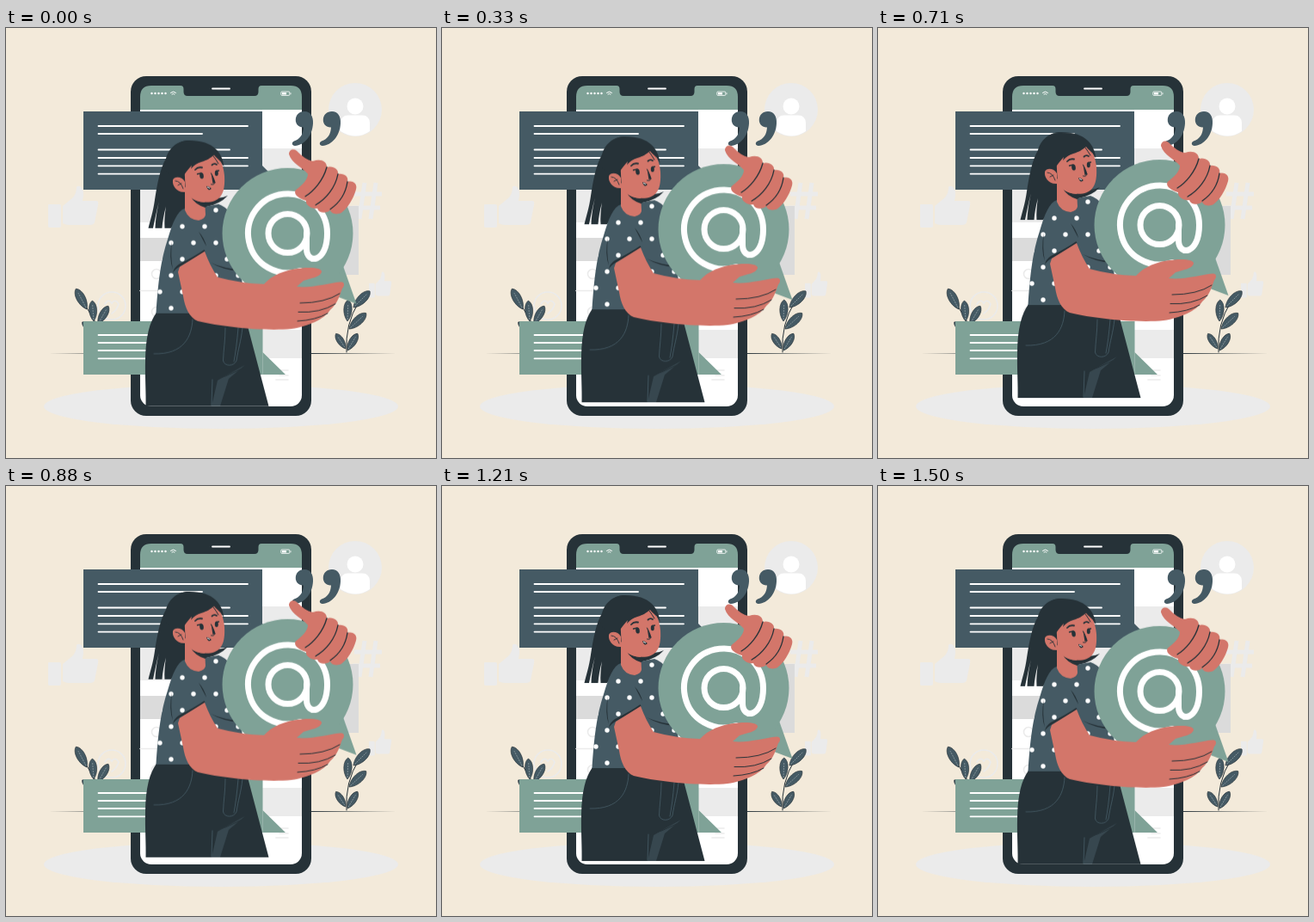
Recreate the animation shown at these times as an HTML page. Size 500 px wide and 500 px high, loop 1.54 s.

```html
<!DOCTYPE html>
<html lang="en">
<head>
<meta charset="utf-8">
<title>Hugging a chat bubble</title>
<style>
  html, body { margin: 0; width: 100%; height: 100%; overflow: hidden; background: #f3eada; }
  svg { display: block; width: 100vw; height: 100vh; }
  .ink { fill: #263238; }
  .slate { fill: #455a64; }
  .sage { fill: #7fa297; }
  .skin { fill: #d3766a; }
  .mist { fill: #ebebeb; }
  .white { fill: #fff; }
  .line { fill: none; stroke: #263238; stroke-linecap: round; stroke-linejoin: round; }
  .seam { fill: none; stroke: #455a64; stroke-width: .9; stroke-linecap: round; }
  .text { fill: none; stroke: #fff; stroke-width: 1.8; stroke-linecap: round; }
  .faint { fill: none; stroke: #ebebeb; stroke-width: 1.6; stroke-linecap: round; }
</style>
</head>
<body>
<svg viewBox="0 0 500 500">
  <defs>
    <pattern id="dots" x="192" y="230" width="26" height="38" patternUnits="userSpaceOnUse">
      <rect width="26" height="38" fill="#455a64"/>
      <g fill="#fff">
        <circle cx="13" cy="0" r="2.7"/><circle cx="13" cy="38" r="2.7"/>
        <circle cx="0" cy="19" r="2.7"/><circle cx="26" cy="19" r="2.7"/>
      </g>
    </pattern>
    <path id="thumb" d="M0 23Q0 22 1 22H13Q15 22 15 24V47Q15 49 13 49H1Q0 49 0 47ZM17 24L29 14Q33 9 33 2Q34 0 37 1Q43 4 40 18H56Q59 18 58 23L54 43Q53 46 49 46H24Q20 46 17 44Z"/>
    <path id="quote" d="M347 97C354 97 357.500 103 357 111C356 126 347 136 336 137C332.500 137 331.500 133 335 131.500C342 129 345.500 124 346 115.500C341 116 336.500 112 336.800 106.500C337 101 341 97 347 97Z"/>
  </defs>

  <!-- backdrop -->
  <ellipse class="mist" cx="250" cy="440" rx="206" ry="26"/>
  <path class="ink" d="M50 378.500L150 378H350L454 378.500L350 379H150Z"/>
  <use href="#thumb" class="mist" x="49" y="183"/>
  <use href="#thumb" class="mist" transform="translate(422 283) scale(.45 .62)"/>
  <path d="M417 180L411 222M430 180L424 222M405 193H437M403 209H435" fill="none" stroke="#ebebeb" stroke-width="5"/>
  <circle class="faint" cx="123" cy="323" r="16"/>
  <path class="faint" d="M115 321Q119 314 123 320Q127 314 131 321Q129 328 123 332"/>
  <circle class="mist" cx="406" cy="95" r="31"/>
  <circle class="white" cx="406" cy="91" r="9.500"/>
  <path class="white" d="M389 120V111Q389 101.500 398 101.500H414Q423 101.500 423 111V120Q407 131 389 120Z"/>
  <g id="plants"></g>

  <!-- phone -->
  <rect class="ink" x="145" y="56" width="210" height="395" rx="18"/>
  <rect class="white" x="156" y="80" width="188" height="360" rx="13"/>
  <path class="white" d="M156 90H344V100H156Z"/>
  <path class="sage" d="M156 95V80Q156 67 169 67H203Q206.500 67 206.500 71V74Q206.500 79 211 79H289Q293.500 79 293.500 74V71Q293.500 67 297 67H331Q344 67 344 80V95Z"/>
  <path class="text" d="M240 70.500H260"/>
  <path class="text" d="M169.500 76H186" stroke-dasharray="0 4" style="stroke-width:2.4"/>
  <path class="text" d="M191.500 75.300Q194.500 72.600 197.500 75.300M193 77Q194.500 75.600 196 77" style="stroke-width:1"/>
  <rect x="319.800" y="74" width="10" height="4.400" rx="1" fill="none" stroke="#fff" stroke-width=".8"/>
  <path class="white" d="M321 75H326V77.500H321ZM330.600 75.200H331.400V77.200H330.600Z"/>
  <path class="mist" d="M156 140H344V226H156ZM298 351H344V384H298Z"/>
  <path d="M156 244H344V271H156ZM355 207H410V287H355Z" fill="#dbdbdb"/>
  <path class="faint" d="M156 305.500H178M314 398H328M318 404H328M314 409H328"/>
  <circle class="faint" cx="175" cy="286" r="5.500"/>
  <circle class="faint" cx="175" cy="330" r="5.500"/>

  <!-- messages -->
  <path class="slate" d="M90 97H298V160L326 188H90Z"/>
  <path class="text" d="M107.500 114H281M107.500 123H228M107.500 141.500H260M107.500 151H281M107.500 160.300H281M107.500 169.600H210"/>
  <path class="sage" d="M90 341H298.500V377L325 403H90Z"/>
  <path class="text" d="M107.500 357H220M107.500 366H220M107.500 375H220M107.500 384.300H220"/>
  <path d="M298.500 377V403" stroke="#a9c1b9" stroke-width=".6"/>
  <use href="#quote" class="slate"/>
  <use href="#quote" class="slate" x="32"/>

  <g id="float">
    <!-- hair behind -->
    <path class="ink" d="M213 130C198 130 189 140 186 151C179 163 176 180 173 199C171 213 168 222 165.500 232H171C173 222 175 212 178 201C175 213 174 223 173.500 232H181.500C182 224 183.500 216 186 207C184.500 216 184 224 184.500 232H192L215 200L233 207Q249 204 258 194Q250 198 242 196L226 150Z"/>
    <!-- trousers -->
    <path class="ink" d="M175 330C167 341 162.500 358 162 385C161.500 405 163 425 162.500 439H305.500L281 346L230 331Z"/>
    <path d="M239 439L246 409L258 402L278 391L259 407L249 439Z" fill="#37474f"/>
    <path class="line" d="M234 411Q256 405 277 394" stroke-width="1"/>
    <path class="seam" d="M217 338C216 358 207 379 172 378M275 348C273 365 270 372 268 386C265 393 254 393 252.500 386C253 373 255 362 255 348M270 348Q268 372 265 387M240 408L239 438"/>
    <!-- shirt -->
    <path fill="url(#dots)" d="M208 209C199 212 194 225 188 245C180 269 177 294 174.500 331H232L275 334V297L262 215Q254 206 247 204L231 207Z"/>
    <path class="ink" d="M238 272Q253 279 272 280V282Q253 281 238 272ZM194 284Q195 278 201 274Q219 265 230.500 257L231.500 259Q218 268 203 276Q197 279 194 284ZM224 236Q231 244 233 253Q229 246 224 236ZM193 247Q191 264 194 280Q189 266 193 247Z"/>
    <!-- neck and face -->
    <path class="skin" d="M208 184V211Q212 222 224 223Q232 221 232 216L231 198Z"/>
    <path class="ink" d="M214 194Q223 205 240 201L231.500 208Q219 204 214 194Z"/>
    <path class="skin" d="M207 157L243 145C250 151 253 161 254 171C255 189 251 199 238 201.500C224 203 213 198 209 190Z"/>
    <path class="ink" d="M205 173C210 166 213 162 216 159L215 163Q220 157 227 155C234 153 238 150 242 147C246 152 250 153 253.500 161C252 145 242 130 213 130C194 130 186 147 184 164L197 177Z"/>
    <path class="skin" d="M208 190C199 191 193 183 194 176C196 171 205 172 208 178Z"/>
    <path class="line" d="M197 177Q203 177 206 186M200 182L204 180" stroke-width=".9"/>
    <ellipse class="ink" cx="227.500" cy="171" rx="2.300" ry="3.500" transform="rotate(-8 227.500 171)"/>
    <ellipse class="ink" cx="244.800" cy="168" rx="2" ry="3.300"/>
    <path class="line" d="M222.500 169L227 168M247.500 165L244.500 165.500" stroke-width="1.300"/>
    <path class="line" d="M239.500 158.500Q242 156 245 158M220 164Q223 160.500 228 161.500" stroke-width="1.800"/>
    <path class="line" d="M241 148Q244 152 247 157M238.500 168Q242 174 243 179Q242 182 238.500 181" stroke-width="1"/>
    <path class="ink" d="M238.500 168L243.500 179L240.500 180Z"/>
    <path class="ink" d="M233 183Q236 183 239 186Q235 190 233 183Z"/>
    <path d="M234 184L237 185.500" stroke="#fff" stroke-width=".9"/>
    <!-- large bubble -->
    <path class="sage" d="M392 276L407.500 320L360 302Z"/>
    <circle class="sage" cx="327.500" cy="238" r="76"/>
    <g fill="none" stroke="#fff" stroke-width="7" stroke-linecap="round">
      <circle cx="327.500" cy="238" r="22.500"/>
      <path d="M349.500 238V256C349.500 274 373.500 273 373.500 238A46 46 0 1 0 342 281.600"/>
    </g>
    <!-- lower arm -->
    <path class="skin" d="M200 283L202 277L231 259C235 270 240 280 246 289Q272 296 300 297C309 287 324 280 344 278.500C357 277 368 279 367 283C365 289 355 290 346 293L338 300C355 302 374 296 389 294.500C394 294 394 299 391 302C388 310 386 319 377 327C370 338 352 346 332 349C302 352 252 347 223 340C213 336 208 324 206 311Z"/>
    <path class="line" d="M342 319Q371 319 388 308M340 329.500Q365 331 383 320M339 340Q360 339 374 331" stroke-width="1"/>
    <!-- upper hand -->
    <path class="skin" d="M329 146C329 141 334 139 338 142C345 149 350 153 357 154C366 151 373 154 373 161C380 159 387 163 386 169C393 168 399 172 397 178C404 176 409 181 407 187C404 198 397 209 390 214C384 217 378 215 377 211C373 215 364 215 362 209C357 210 348 206 349 200C343 198 334 194 336.500 188C344 182 351 176 351 169C346 162 332 157 329 146Z"/>
    <path class="line" d="M373 161C369 176 358 189 348 195M386 169C383 185 372 198 360 205M397 178C395 192 387 203 377 210" stroke-width="1.300"/>
  </g>
</svg>
<script>
  // x, y of the leaf base, heading in degrees, length
  const leaves = [
    [94, 327, -28, 27], [102, 341, -4, 24], [107, 344, 30, 24], [102, 354, -48, 18],
    [404, 325, 45, 27], [397, 341, 2, 25], [399, 350, 47, 27],
    [395, 373, -33, 21], [397, 375, 31, 23]
  ];
  const leaf = ([x, y, turn, len]) => {
    const w = len * .25;
    return `<g transform="translate(${x} ${y}) rotate(${turn})">
      <path d="M0 0C${-w} ${-len * .3} ${-w} ${-len * .85} 0 ${-len}C${w} ${-len * .85} ${w} ${-len * .3} 0 0Z"
        fill="#455a64" stroke="#263238" stroke-width=".6"/>
      <path d="M0 -2V${-len * .8}" stroke="#a6b1b5" stroke-width=".6" stroke-dasharray="2 1"/></g>`;
  };
  document.getElementById('plants').innerHTML =
    '<path class="line" d="M110 352Q102 339 86 312M396 377Q394 344 410 319" stroke-width="1"/>' +
    leaves.map(leaf).join('');

  const loop = 1540;
  const lift = [[0, .7], [735, -9.2], [1500, .8], [loop, .7]];
  const float = document.getElementById('float').animate(
    lift.map(([t, y]) => ({ offset: t / loop, transform: `translateY(${y}px)` })),
    { duration: loop, iterations: Infinity, easing: 'linear' }
  );
  float.startTime = document.timeline.currentTime;
</script>
</body>
</html>
```
